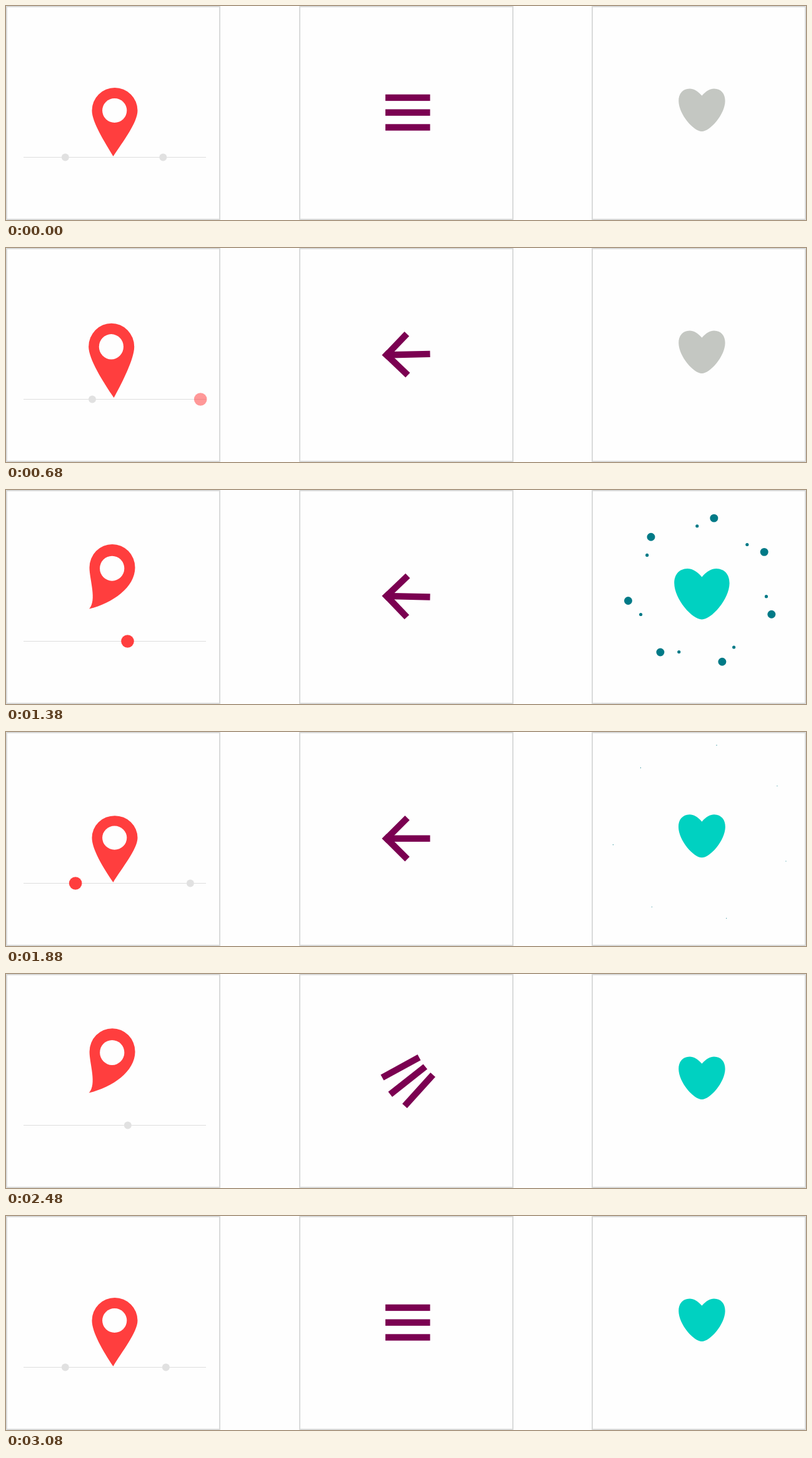
Write an HTML page with a canvas that moves like this. It is 1280 by 343 pixels and loops after 3.12 s.

```html
<!DOCTYPE html>
<html lang="en">
<head>
<meta charset="utf-8">
<title>Icon motion</title>
<style>
  html, body { margin: 0; width: 100%; height: 100%; overflow: hidden; background: #fefefe; }
  canvas { display: block; width: 1280px; height: 343px; }
</style>
</head>
<body>
<canvas id="stage" width="1280" height="343"></canvas>
<script>
const ctx = document.getElementById('stage').getContext('2d');
const LOOP = 3120;
const BG = '#fefefe', RED = '#ff3e3e', GREY = '#e1e1e1', PLUM = '#7b0051';
const TEAL = '#00d1c1', DEEP = '#007a87', ASH = '#c4c7c2';
const PI = Math.PI, TAU = PI * 2, RAD = PI / 180;

const clamp = (v, a = 0, b = 1) => Math.min(b, Math.max(a, v));
const mix = (a, b, k) => a + (b - a) * k;
const part = (t, a, b) => clamp((t - a) / (b - a));
const ramp = (t, a, b) => { const k = part(t, a, b); return k * k * (3 - 2 * k); };

function oval(x, y, rx, ry, color) {
  ctx.fillStyle = color;
  ctx.beginPath();
  ctx.ellipse(x, y, Math.max(0, rx), Math.max(0, ry), 0, 0, TAU);
  ctx.fill();
}
const disc = (x, y, r, color) => oval(x, y, r, r, color);

// ---- Pin hopping over passing dots ----
const SPEED = 1 / 6, PIN_X = 171, GROUND = 241, BODY = 73.5, HEAD = 36.5;
const PASSES = [-456, 483, 1522, 2624, 3590]; // when each dot is under the pin
const RED_DOT = 2;

// Pose at u ms from the moment a dot passes: crouch, flight, landing dip
function hop(u) {
  const air = part(u, -310, 200), landed = part(u, 205, 410);
  const rise = 1 - (1 - part(u, -310, 20)) ** 2.5;
  const lift = 52 * rise * (1 - part(u, 20, 210) ** 3);
  const sink = 29 * (ramp(u, -478, -390) - ramp(u, -390, -310));
  const dip = 12 * Math.sin(PI * landed) * (1 - landed);
  const bend = 1.14 * Math.sin(TAU * air);
  const x = 174 - 5.3 * (ramp(u, -310, -60) - ramp(u, 200, 330));
  const y = GROUND - BODY + sink + dip - lift;
  const length = Math.min(GROUND - y, 82 - 7 * Math.abs(bend));
  const swing = 28 * RAD * bend;
  return {
    x, y, bend,
    tipX: mix(PIN_X + .5, x - 2.5, Math.sin(PI * air)) - length * Math.sin(swing),
    tipY: y + length * Math.cos(swing),
    stretch: Math.min(1.03, length / BODY)
  };
}

function drawPin(t) {
  const pass = PASSES.slice(1, 4).filter(p => t >= p - 480).pop();
  const { x, y, tipX, tipY, bend, stretch } = hop(pass === undefined ? -480 : t - pass);
  const k = Math.min(1, Math.abs(bend)), flip = bend < 0 ? -1 : 1;
  // one side of the tail curls under, the other sweeps out
  const inner = [mix(-13.5, 13, k), mix(-23, -14, k), 19];
  const outer = [mix(16, 38, k), mix(-24, -9, k), mix(19, 31, k)];
  const [right, left] = flip > 0 ? [outer, inner] : [inner, outer];
  ctx.fillStyle = RED;
  ctx.beginPath();
  ctx.ellipse(x, y, HEAD, HEAD * stretch, 0, PI, TAU);
  ctx.bezierCurveTo(x + HEAD, y + right[2] * stretch,
    tipX + flip * right[0], tipY + right[1] * stretch, tipX, tipY);
  ctx.bezierCurveTo(tipX + flip * left[0], tipY + left[1] * stretch,
    x - HEAD, y + left[2] * stretch, x - HEAD, y);
  ctx.fill();
  oval(x - .3, y + k * 1.5, 19.6, 19.6 * stretch, BG);
}

function drawTrail(t) {
  ctx.fillStyle = '#dedede';
  ctx.fillRect(28, 242, 292, 1);
  PASSES.forEach((pass, i) => {
    const x = PIN_X - (t - pass) * SPEED, red = i === RED_DOT;
    ctx.globalAlpha = Math.min(1 - part(x, 300, 324), part(x, 22, 38));
    disc(x, 242.5, red ? 10.3 : 6, red ? RED : GREY);
  });
  ctx.globalAlpha = 1;
}

// ---- Menu turning into a back arrow ----
function drawMenu(t) {
  const p = ramp(t, 60, 540) - ramp(t, 2200, 2600);
  const sway = 1.3 * Math.sin(TAU * part(t, 540, 1880) ** .64);
  const len = mix(71.5, 52, p), thick = 10.4;
  ctx.save();
  ctx.translate(642.8, 170.7);
  ctx.rotate(-(180 * p + sway) * RAD);
  ctx.fillStyle = PLUM;
  ctx.fillRect(-35.75, -thick / 2, 71.5, thick);
  for (const side of [-1, 1]) {
    ctx.save();
    ctx.translate(19.1 * p, side * mix(23.8, 14.7, p * p));
    ctx.rotate(-side * 45 * p * RAD);
    ctx.fillRect(-len / 2, -thick / 2, len, thick);
    ctx.restore();
  }
  ctx.restore();
}

// ---- Heart with ring and sparks ----
function drawHeart(scale, color) {
  ctx.save();
  ctx.translate(1113.4, 166.8);
  ctx.scale(scale, scale);
  ctx.fillStyle = color;
  ctx.beginPath();
  ctx.moveTo(0, -23);
  ctx.bezierCurveTo(7, -31, 13, -34.3, 19.5, -34.3);
  ctx.bezierCurveTo(31, -34, 37.3, -26, 37.2, -14.5);
  ctx.bezierCurveTo(37, 7, 13, 34.3, 0, 34.3);
  ctx.bezierCurveTo(-13, 34.3, -37, 7, -37.2, -14.5);
  ctx.bezierCurveTo(-37.3, -26, -31, -34, -19.5, -34.3);
  ctx.bezierCurveTo(-13, -34.3, -7, -31, 0, -23);
  ctx.fill();
  ctx.restore();
}

function drawRing(t) {
  const outer = 78 * (1 - (1 - part(t, 900, 1180)) ** 2);
  disc(1112.2, 161.2, outer, DEEP);
  disc(1112.2, 161.2, 78 * ramp(t, 1020, 1180), BG);
}

function drawSparks(t) {
  const a = part(t, 1140, 1920), spread = a ** .39;
  for (let i = 0; i < 7; i++) {
    const deg = -82.5 + i * 360 / 7 + 2.3 * Math.cos(1.9 * i);
    const spark = (angle, d, r) => disc(
      1112.7 + d * Math.cos(angle * RAD), 161.7 + d * Math.sin(angle * RAD), r, DEEP);
    spark(deg, 74 + 70 * spread, 7.8 * (1 - a ** 1.5));
    spark(deg - 13.6, 70 + 54 * spread, 3.5 * (1 - (a / .75) ** 1.5));
  }
}

function drawLike(t) {
  if (t < 940) drawHeart(1 - ramp(t, 850, 940), ASH);
  if (t > 900 && t < 1180) drawRing(t);
  if (t > 1140 && t < 1920) drawSparks(t);
  const age = t - 1130;
  if (age > 0) drawHeart(1 - Math.exp(-age / 150) * Math.cos(PI * age / 250), TEAL);
}

function render(t) {
  ctx.fillStyle = BG;
  ctx.fillRect(0, 0, 1280, 343);
  ctx.strokeStyle = '#d9dada';
  ctx.lineWidth = 2;
  for (const x of [0, 469, 937]) ctx.strokeRect(x + 1, 1, 341, 341);
  drawTrail(t);
  drawPin(t);
  drawMenu(t);
  drawLike(t);
}

const origin = performance.now();
function tick(now) {
  render(Math.max(0, now - origin) % LOOP);
  requestAnimationFrame(tick);
}
render(0);
requestAnimationFrame(tick);
</script>
</body>
</html>
```
